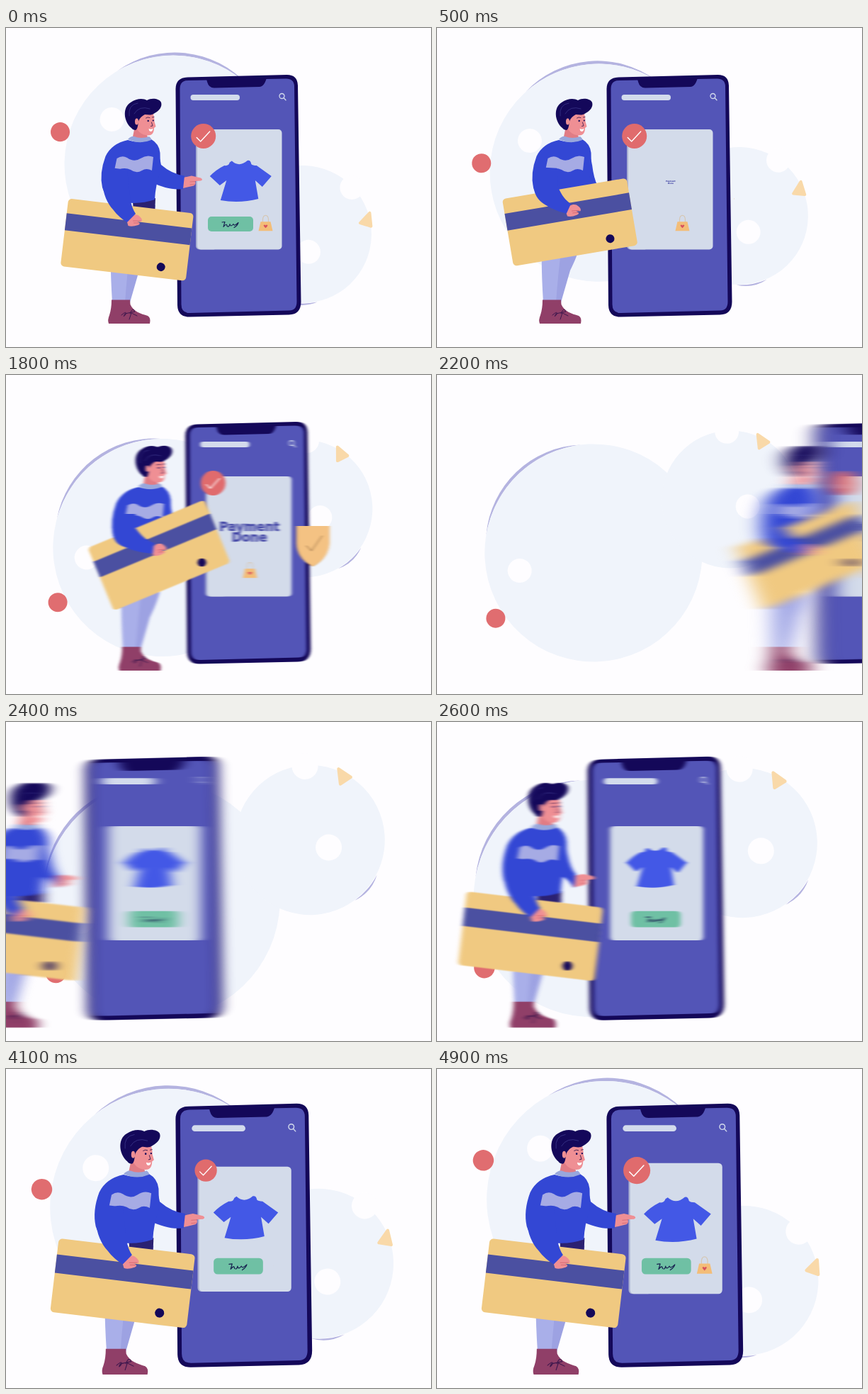
Recreate the animation shown at these times as an HTML page. Size 600 px wide and 450 px high, loop 5 s.

```html
<!DOCTYPE html>
<html lang="en">
<head>
<meta charset="utf-8">
<title>Payment done</title>
<style>
  html, body { margin: 0; width: 100%; height: 100%; overflow: hidden; background: #fefdff; }
  svg { display: block; width: 100%; height: 100%; }
  text { font: bold 17.3px "DejaVu Sans", Verdana, sans-serif; text-anchor: middle; fill: #484ba8; stroke: #484ba8; stroke-width: .5; }
  .line { fill: none; stroke-linecap: round; stroke-linejoin: round; }
</style>
</head>
<body>
<svg viewBox="0 0 600 450">
  <filter id="smear" filterUnits="userSpaceOnUse" x="0" y="0" width="600" height="450" color-interpolation-filters="sRGB">
    <feGaussianBlur id="blur" stdDeviation="0 0"/>
  </filter>

  <g id="camera">
    <g id="backdrop">
      <g fill="#b4b3e0">
        <path d="M96.5 130.9A139 139 0 0 1 272.3 73.8A153.6 153.6 0 0 0 96.5 130.9Z"/>
        <path d="M487.3 313.5A55 55 0 0 1 446.9 330.6A97.5 97.5 0 0 0 487.3 313.5Z"/>
      </g>
      <g fill="#f0f4fb">
        <circle cx="222.3" cy="219" r="153.6"/>
        <circle cx="429.5" cy="234.6" r="97"/>
      </g>
      <g fill="#fefdff">
        <circle cx="117.5" cy="196.5" r="17"/>
        <circle cx="447" cy="254" r="17"/>
        <circle cx="466" cy="146" r="17"/>
      </g>
      <circle cx="58" cy="242.5" r="13.5" fill="#e06d70"/>
      <path d="M503.5 168.5L497 187L513 185Z" fill="#f9d9a9" stroke="#f9d9a9" stroke-width="4" stroke-linejoin="round"/>
    </g>

    <g id="phone">
      <path d="M256.500 69.500L396.500 66Q411.500 66 412 81L416.500 386Q416.500 404 399.500 404.500L259.500 407.500Q242.500 408 242 391L239.500 86Q239.500 70 256.500 69.500Z" fill="#140859"/>
      <path d="M257.500 74L395.500 71.500Q406.500 71.500 407 82L410.500 386Q410.500 398.500 399.500 398.500L259.500 402Q247.500 402 247.500 390L245.500 86Q245.500 74 257.500 74Z" fill="#5355b7"/>
      <path d="M282.500 70L284 76Q286.500 85 294.500 84.500L357.500 83Q365.500 82.500 368.500 68Z" fill="#140859"/>
      <rect x="260.500" y="94" width="69.500" height="8" rx="4" fill="#d3dbec"/>
      <path class="line" d="M392 98.500L395 101.800M393 96A3.500 3.500 0 1 0 386 96A3.500 3.500 0 1 0 393 96" stroke="#d3dbec" stroke-width="1.300"/>

      <rect id="panelEdge" x="268" width="30" rx="5" fill="#aab1d2"/>
      <rect id="panel" x="270" width="119.500" rx="5" fill="#d3dbea"/>

      <path id="shirt" fill="#4358e6" d="M-12.500 -28.500Q-2 -19 9.500 -29Q14 -30 15 -24Q17 -22 22.500 -22L43.500 -7L30.500 8L20.500 -1L25 25Q-2 32 -28.500 27L-20 -1L-29.500 6L-43.500 -7Q-35 -16 -23 -22Q-17 -21 -15.500 -26.500Z"/>
      <g id="button">
        <rect x="-32" y="-10.500" width="64" height="21" rx="5" fill="#6fc0a4"/>
        <path class="line" d="M-12 -2.500L-8 -3L-10 4Q-5 -2 -5 3Q-2 5 -1 0Q0 5 4 0Q5 4 11 -2Q10 2 5 5" stroke="#17204f" stroke-width="1.100"/>
      </g>
      <g id="done">
        <text y="2.500">Payment</text>
        <text y="18">Done</text>
      </g>
      <g id="bag">
        <path class="line" d="M-4 0V-6Q-3.500 -11.500 0 -11.500Q3.500 -11.500 4 -6V0" stroke="#d6c7b4" stroke-width="1.200"/>
        <path d="M-7 -2.500H7L10 10.500H-10Z" fill="#f3bd78"/>
        <path d="M0 6.500Q-5 1.800 -1.300 1.600L0 2.600L1.300 1.600Q5 1.800 0 6.500Z" fill="#d8525e"/>
      </g>
      <g id="badge">
        <circle r="17.500" fill="#e06b6d"/>
        <path class="line" d="M-9.500 2L-4 7.500L9 -6.500" stroke="#fff" stroke-width="1.400"/>
      </g>
      <g id="shield">
        <path d="M-23.500 -28H23.500V-4Q22 18 0 29.500Q-23 18 -23.500 -4Z" fill="#dfae70"/>
        <path d="M-21.500 -28H23.500V-4Q22 17 0 28.500Q-21 17 -21.500 -4Z" fill="#f4c283"/>
        <path class="line" d="M-9 0L-2 7L13 -14" stroke="#b38a5a" stroke-width="1.300"/>
      </g>
    </g>

    <g id="person">
      <path d="M182 250H211C208 290 202 315 188 342L175 387H165L168 300Z" fill="#9da2e2"/>
      <path d="M152 255L186 250Q174 305 168 387H150Q147 340 148 310Z" fill="#a9afe9"/>
      <path d="M179 243L211 240L210 262L180 262Z" fill="#2b2172"/>
      <path d="M149 383.500H175L175.500 390C180 400 190 403 200 406Q205 409 203 417H145Q143 412 146 405Q149 396 149 383.500Z" fill="#903f68"/>
      <path class="line" d="M163 405Q171 398 169 404Q164 410 168 403L182 400Q179 393 175 403M174 411L177 402L185 406" stroke="#3d174d" stroke-width="1"/>

      <path d="M183 134L178 158Q189 163 201 157L198 148Z" fill="#e07c85"/>
      <path d="M187 124L207 118C209 124 209.500 128 209.500 132L211.500 139L209 141C209 148 206 152 200 151.500C191 151 184 145 183 136Z" fill="#ef8f94"/>
      <path d="M177 141C166 132 164 112 176 105C184 99 194 99 199 102C206 98 217 100 219 105C221 111 216 117 210 120C205 124 200 122 196 122C190 125 188 129 187 132C186 138 186 142 183 144Q179 144 177 141Z" fill="#14085a"/>
      <path class="line" d="M174 124Q172 108 186 106M181 121Q188 109 203 114" stroke="#454397" stroke-width=".6"/>
      <ellipse cx="184.500" cy="132" rx="2.500" ry="4.500" fill="#ef8f94"/>
      <path class="line" d="M197.500 127Q200 125 203 126.500M206.500 126L209 125.500M205.500 133L207 138L204.500 138.500" stroke="#472052" stroke-width=".9"/>
      <circle cx="200.700" cy="131" r="1.200" fill="#14085a"/>
      <circle cx="207.800" cy="130.500" r="1.100" fill="#14085a"/>
      <path d="M201.500 142Q204.500 143.500 207.500 141.800Q207 146 204 146Q201.500 145 201.500 142Z" fill="#fff"/>

      <g id="pointHand" fill="#ef8f94">
        <path d="M250 211L262 208.500L275 211.500Q279 214 275 215.500L267 216Q269 222 263 223L250 226Z"/>
        <path class="line" d="M260 217L267 216.500M260 221L266 220.500" stroke="#d1656f" stroke-width=".7"/>
      </g>
      <path id="pointArm" fill="#3347d4"/>
      <path d="M172 158Q189 164 205 157Q216 163 217.500 176L218 202Q211 222 210 242Q189 249 169 246Q141 243 136 225Q131.500 205 140.500 181Q149 163 172 158Z" fill="#3347d4"/>
      <path d="M172 157Q177 152 181 153Q191 157 202 153Q206 156 205 158Q189 165 172 157Z" fill="#98a7dc"/>
      <path d="M156.500 184Q164 179 171 183Q181 190 190 184Q199 178 208 182L206 201Q198 197 192 201Q184 206 176 200Q165 195 152.500 203Z" fill="#a6abe4"/>

      <g id="card">
        <rect x="-89" y="-48" width="178" height="96" rx="5" fill="#f0c981"/>
        <rect x="-89" y="-27" width="178" height="24" fill="#4b50a1"/>
        <circle cx="52" cy="32.500" r="6" fill="#140859"/>
      </g>
      <g id="gripHand">
        <path d="M-10 1C-7 -8 2 -9 6 -7Q13 -2 11 2L5 2Q11 5 6 7Q-3 10 -8 8Z" fill="#ef8f94"/>
        <path class="line" d="M-1 1L9 1M0 4L7 4" stroke="#d1656f" stroke-width=".8"/>
      </g>
      <path id="gripArm" fill="#3347d4"/>
    </g>
  </g>
</svg>
<script>
const LOOP = 5, CUT = 2.3;
const turns = [[0, 24.1], [.6, 10.4], [1, 0], [1.8, -19.6], [2.2, -25.6], [2.6, -24.6],
               [3.4, -4.1], [4.2, 18.4], [4.9, 26], [5, 26]];
const armLow = 'M139 196C131 225 142 246 151 256C157 264 164 270 171 274L183 262C179 256 176 248 175 236L171 200Z';
const armHigh = 'M139 196C130 225 138 238 151 242C167 249 179 251 192 252L194 237C184 234 176 227 168 216L168 196Z';

const $ = id => document.getElementById(id);
const mix = (a, b, p) => a + (b - a) * p;
const part = (t, a, b) => Math.min(1, Math.max(0, (t - a) / (b - a)));
const ease = (t, a, b) => { const p = part(t, a, b); return p * p * (3 - 2 * p); };
const pop = (t, a, b) => { const p = part(t, a, b) - 1; return 1 + p * p * (2.7 * p + 1.7); };

function morph(a, b, p) {
  const goal = b.match(/\d+/g);
  let i = 0;
  return a.replace(/\d+/g, n => mix(+n, +goal[i++], p).toFixed(2));
}

function place(id, x, y, scale = 1, angle = 0) {
  $(id).setAttribute('transform', `translate(${x} ${y}) rotate(${angle}) scale(${Math.max(scale, 0)})`);
}

// Smooth curve through the backdrop's key angles
function turn(t) {
  const last = turns.length - 1;
  const slope = i => {
    const [a, b] = [turns[Math.max(i - 1, 0)], turns[Math.min(i + 1, last)]];
    return (b[1] - a[1]) / (b[0] - a[0]);
  };
  let i = 0;
  while (i < last - 1 && t >= turns[i + 1][0]) i++;
  const [[t0, a], [t1, b]] = [turns[i], turns[i + 1]];
  const h = t1 - t0, p = (t - t0) / h, q = 1 - p;
  return q * q * (1 + 2 * p) * a + p * p * (3 - 2 * p) * b + h * p * q * (q * slope(i) - p * slope(i + 1));
}

// Slide out to the right before the cut, in from the left after it
const slide = t => t < CUT
  ? 322 * Math.max(0, (t - 1.6) / .6) ** 2.8
  : -284 * Math.max(0, (2.87 - t) / .6) ** 2.8;

function draw(t) {
  const shop = t >= CUT;
  const pay = shop ? 0 : ease(t, .15, .8);
  const grow = shop ? ease(t, 3.8, 4.3) : 1;
  const leave = shop ? 0 : ease(t, .1, .45);
  const x = slide(t);

  $('camera').setAttribute('transform', shop ? 'translate(-21.4 -23) scale(1.089)' : '');
  $('backdrop').setAttribute('transform', `rotate(${turn(t)} 292 238)`);
  place('person', x, 0);
  place('phone', x * (shop ? .82 : .91), 0);

  const speed = Math.abs(slide(t + .002) - slide(t - .002)) / .004;
  const smear = Math.abs(t - CUT) < .003 ? 13 : Math.min(speed * .009, 20);
  $('blur').setAttribute('stdDeviation', smear + ' 0');
  for (const id of ['person', 'phone']) {
    if (smear > .1) $(id).setAttribute('filter', 'url(#smear)');
    else $(id).removeAttribute('filter');
  }

  const top = mix(156, 143, grow), bottom = mix(304, 312.5, grow);
  for (const id of ['panel', 'panelEdge']) {
    $(id).setAttribute('y', top);
    $(id).setAttribute('height', bottom - top);
  }
  place('shirt', mix(329, 331.3, grow), mix(209.6, 216, grow), mix(.9, 1, grow) * (1 - leave));
  place('button', mix(328, 317, grow), 276.5, 1 - leave);
  place('done', 329.8, 217, shop ? 0 : ease(t, .4, .8));
  place('bag', mix(366.5, 330.7, pay), 275.8, shop ? pop(t, 4.1, 4.5) : 1);
  place('badge', 278.7, 152.5, shop ? pop(t, 4, 4.4) : 1);
  place('shield', 419.5, 241, shop ? 0 : pop(t, .5, .9));

  let hx = -45 * pay, hy = 25 * pay;
  if (shop) {
    const reach = ease(t, 2.5, 3.1), press = ease(t, 3.55, 3.8);
    hx = mix(mix(-24, -8, reach), 0, press);
    hy = mix(mix(10, 2, reach), 0, press);
  }
  place('pointHand', hx, hy);
  $('pointArm').setAttribute('d', `M205 168C217 176 218 188 219 193Q${234 + hx / 2} ${206 + hy / 2} ${252 + hx} ${208.5 + hy}`
    + `L${250 + hx} ${227 + hy}C${236 + hx / 2} ${229 + hy / 2} 222 225 206 218Z`);

  place('card', mix(170.9, 201, pay), mix(298.7, 254.3, pay), 1, mix(6.8, -22.5, pay));
  place('gripHand', mix(180.5, 200, pay), mix(271, 246, pay), 1, -8 * pay);
  $('gripArm').setAttribute('d', morph(armLow, armHigh, pay));
}

function tick() {
  draw(performance.now() / 1000 % LOOP);
  requestAnimationFrame(tick);
}
tick();
</script>
</body>
</html>
```
